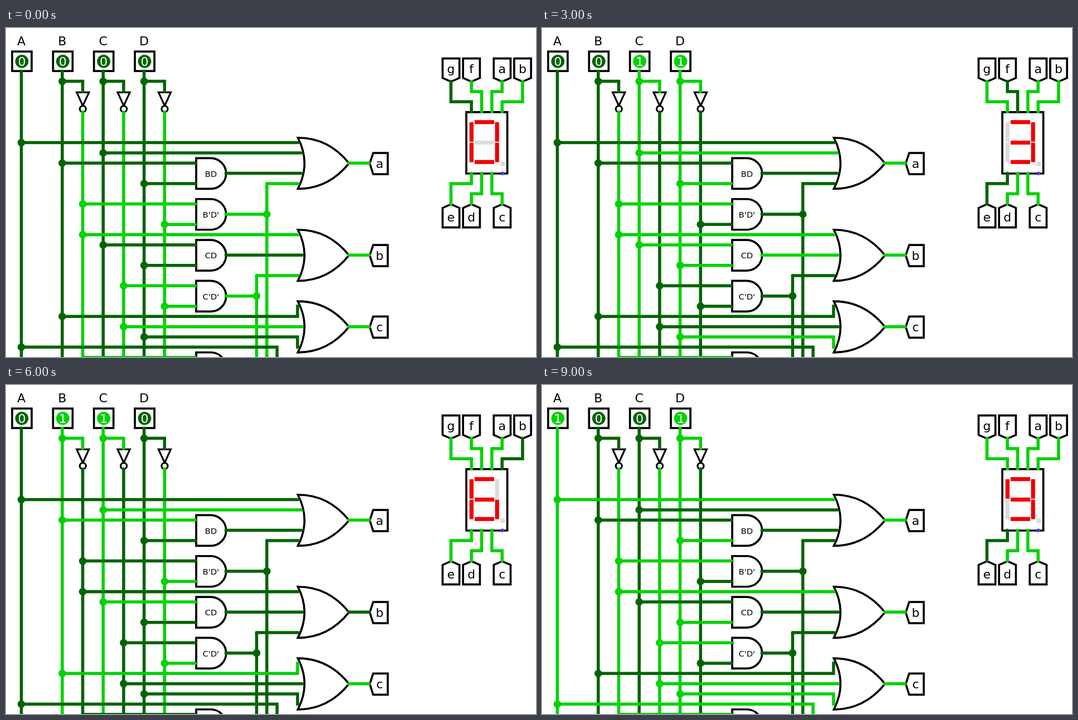
An HTML page for the animation above (10000 ms loop, 950 px wide and 590 px high).

```html
<!DOCTYPE html>
<html lang="en">
<head>
<meta charset="utf-8">
<title>BCD to seven-segment decoder</title>
<style>
  html, body { margin: 0; width: 100%; height: 100%; overflow: hidden; background: #fff; }
  svg { display: block; }
  text { font: 22px "DejaVu Sans", sans-serif; text-anchor: middle; }
  .small { font-size: 14.7px; }
  .part { fill: #fff; stroke: #000; stroke-width: 3.67; }
  .wire { fill: none; stroke: currentColor; stroke-width: .3; stroke-linecap: round; }
  .dot { fill: currentColor; }
</style>
</head>
<body>
<svg id="stage" width="950" height="590" viewBox="0 0 950 590"></svg>
<script>
const UNIT = 18.335, LEFT = 27.5, TOP = 95.6;
const X = col => LEFT + col * UNIT;
const Y = row => TOP + row * UNIT;
const ON = '#00d200', OFF = '#006400', LIT = '#f00000', UNLIT = '#dcdcdc';
const SEGMENTS = ['abcdef', 'bc', 'abdeg', 'abcdg', 'bcfg', 'acdfg', 'acdefg', 'abc', 'abcdefg', 'abcdfg'];

// Wires on the circuit grid: trunk path, branch path, junctions
const NETS = {
  A: ['M0-1V29', 'M0 6H27.05M0 26H25V29', [[0, 6], [0, 26]]],
  B: ['M4-1V29', 'M4 0H6V1M4 8H17M4 23H27V22H27.05', [[4, 0], [4, 8], [4, 23]]],
  C: ['M8-1V29', 'M8 0H10V1M8 7H27.35M8 16H17', [[8, 0], [8, 7], [8, 16]]],
  D: ['M12-1V29', 'M12 0H14V1M12 10H17M12 18H17M12 25H27V26H27.05', [[12, 0], [12, 10], [12, 18], [12, 25]]],
  nB: ['M6 3V27', 'M6 12H17M6 15H27.05M6 27H17', [[6, 12], [6, 15]]],
  nC: ['M10 3V29', 'M10 20H17M10 24H27.45', [[10, 20], [10, 24]]],
  nD: ['M14 3V29', 'M14 14H17M14 22H17', [[14, 14], [14, 22]]],
  BD: ['', 'M20 9H27.35', []],
  nBnD: ['M24 10V29', 'M20 13H24M24 10H27.05', [[24, 13]]],
  CD: ['', 'M20 17H27.45', []],
  nCnD: ['M23 19V29', 'M20 21H23M23 19H27.05', [[23, 21]]],
  a: ['', 'M32 8H34M47 0V1H46V3', []],
  b: ['', 'M32 17H34M49 0V2H47V3', []],
  c: ['', 'M32 24H34M47 12V11H46V9', []],
  d: ['', 'M44 12V11H45V9', []],
  e: ['', 'M42 12V10H44V9', []],
  f: ['', 'M44 0V1H45V3', []],
  g: ['', 'M42 0V2H44V3', []],
};

const part = d => `<path class="part" d="${d}"/>`;
const label = (s, x, y, cls = '') => `<text class="${cls}" x="${x}" y="${y}">${s}</text>`;

function andGate(row, name) {
  const y = Y(row) + .3, r = 27.5;
  return part(`M340.9 ${y - r}H367a${r} ${r} 0 0 1 0 ${2 * r}H340.9Z`) + label(name, 367.3, y + 5.8, 'small');
}

function orGate(row) {
  const x = X(32) + .6, y = Y(row) + .3, h = 45.85;
  return part(`M${x} ${y}q-36.7 ${-h} -91.7 ${-h}q23.8 ${h} 0 ${2 * h}q55 0 91.7 ${-h}Z`);
}

function inverter(col) {
  const x = X(col) + .2;
  return `<path class="part" style="stroke-width:3.2" d="M${x - 11} 115.4h22l-11 24Z"/>
    <circle class="part" style="stroke-width:3.2" cx="${x}" cy="145.2" r="5.5"/>`;
}

function outputTag(name, row) {
  const y = Y(row) + .5;
  return part(`M652 ${y}L658.2 ${y - 18.7}H684.3V${y + 19.3}H658.2Z`) + label(name, 669.8, y + 8.2);
}

// dir -1 puts the body above its tip, 1 below
function displayTag(name, col, row, dir) {
  const x = X(col), y = Y(row) + .5;
  return part(`M${x} ${y}L${x - 15} ${y + 6.5 * dir}V${y + 41.5 * dir}H${x + 15.2}V${y + 6.5 * dir}Z`)
    + label(name, x, dir < 0 ? 81 : 347);
}

function inputPin(name, col) {
  const x = X(col);
  return `<rect class="part" x="${x - 16.5}" y="42.2" width="35" height="35"/>
    <circle class="dot" data-net="${name}" cx="${x + .9}" cy="59.8" r="11.9"/>
    <text data-bit="${name}" x="${x + .9}" y="67.5" fill="#fff">0</text>` + label(name, x, 31);
}

function display() {
  const bar = (name, x, y, wide) =>
    `<rect data-seg="${name}" x="${x}" y="${y}" width="${wide ? 35 : 7.2}" height="${wide ? 7.2 : 35}"/>`;
  return part('M825.1 150.9H898.6V261H825.1Z')
    + bar('a', 840, 165.2, true) + bar('g', 840, 201.9, true) + bar('d', 840, 236.7, true)
    + bar('f', 830.8, 168.9) + bar('b', 876.6, 168.9) + bar('e', 830.8, 205.6) + bar('c', 876.6, 205.6)
    + `<circle cx="890.4" cy="243.5" r="4.6" fill="${UNLIT}"/>`;
}

const wires = layer => Object.entries(NETS).map(([net, paths]) =>
  `<path class="wire" data-net="${net}" d="${paths[layer]}"/>`).join('');
const junctions = Object.entries(NETS).flatMap(([net, [, , spots]]) => spots.map(([x, y]) =>
  `<circle class="dot" data-net="${net}" cx="${x}" cy="${y}" r=".37"/>`)).join('');

const stage = document.getElementById('stage');
stage.innerHTML = [
  ...[...'ABCD'].map((name, i) => inputPin(name, i * 4)),
  ...[6, 10, 14].map(inverter),
  andGate(9, 'BD'), andGate(13, "B'D'"), andGate(17, 'CD'), andGate(21, "C'D'"), andGate(28, ''),
  ...[8, 17, 24].map(orGate),
  outputTag('a', 8), outputTag('b', 17), outputTag('c', 24),
  displayTag('g', 42, 0, -1), displayTag('f', 44, 0, -1), displayTag('a', 47, 0, -1), displayTag('b', 49, 0, -1),
  displayTag('e', 42, 12, 1), displayTag('d', 44, 12, 1), displayTag('c', 47, 12, 1),
  display(),
  `<g transform="translate(${LEFT} ${TOP}) scale(${UNIT})">`, wires(0), wires(1), junctions, '</g>',
  '<circle cx="889.7" cy="260.8" r="3.2" fill="#4040ff"/>',
].join('');

function evaluate(n) {
  const [A, B, C, D] = [8, 4, 2, 1].map(bit => (n & bit) > 0);
  const state = { A, B, C, D, nB: !B, nC: !C, nD: !D, BD: B && D, nBnD: !B && !D, CD: C && D, nCnD: !C && !D };
  for (const s of 'abcdefg') state[s] = SEGMENTS[n].includes(s);
  return state;
}

const nets = stage.querySelectorAll('[data-net]');
const bits = stage.querySelectorAll('[data-bit]');
const segs = stage.querySelectorAll('[data-seg]');
let shown = -1;

function show(n) {
  const state = evaluate(n);
  nets.forEach(el => el.style.color = state[el.dataset.net] ? ON : OFF);
  bits.forEach(el => el.textContent = +state[el.dataset.bit]);
  segs.forEach(el => el.style.fill = state[el.dataset.seg] ? LIT : UNLIT);
  shown = n;
}

function tick() {
  const n = Math.floor((performance.now() - start) / 1000) % 10;
  if (n !== shown) show(n);
  requestAnimationFrame(tick);
}

const start = performance.now();
tick();
</script>
</body>
</html>
```
